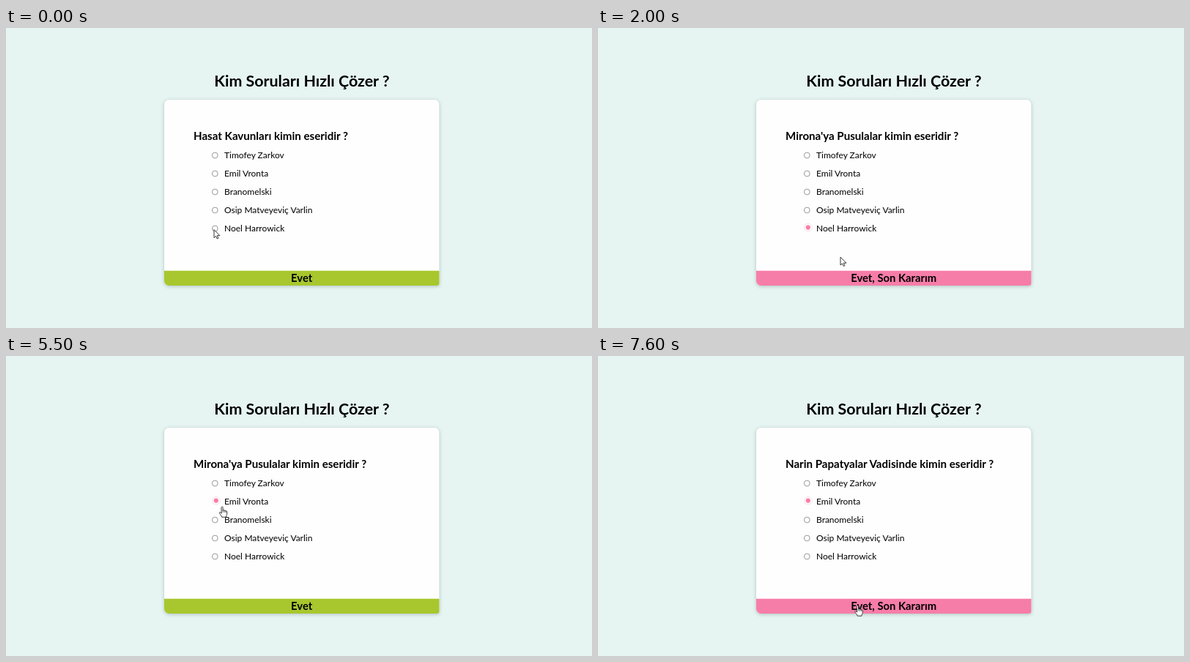
Write an HTML page that moves like this. It is 800 px wide and 410 px high and loops after 8 s.

```html
<!DOCTYPE html>
<html lang="tr">
<head>
<meta charset="utf-8">
<title>Quiz</title>
<style>
  html, body { margin: 0; width: 100%; height: 100%; overflow: hidden; background: #e6f5f2; }
  svg { display: block; width: 800px; height: 410px; }
  text { font-family: Lato, "Open Sans", sans-serif; fill: #000; }
  .bold { font-weight: 700; }
  .card { fill: #fffeff; filter: drop-shadow(0 1.5px 2.5px rgba(20, 50, 45, .28)); }
  .ring { fill: #fff; stroke: #85858a; stroke-width: .85; }
  .halo { fill: #fffafc; stroke: #eedfe6; stroke-width: .8; }
  .dot { fill: #f77da8; }
  .cursor { fill: #fff; stroke: #222; stroke-width: .9; stroke-linejoin: round; stroke-linecap: round; }
</style>
</head>
<body>
<svg viewBox="0 0 800 410">
  <text class="bold" x="404" y="80" font-size="21.4" text-anchor="middle">Kim Soruları Hızlı Çözer ?</text>
  <path class="card" d="M222.5 98H585A6.5 6.5 0 0 1 591.5 104.5V349Q591.5 352 588.5 352H222.5A6.5 6.5 0 0 1 216 345.5V104.5A6.5 6.5 0 0 1 222.5 98Z"/>
  <path id="button" d="M216 331.7H591.5V349Q591.5 352 588.5 352H222.5A6.5 6.5 0 0 1 216 345.5Z"/>
  <text id="label" class="bold" x="403.7" y="347" font-size="14.8" text-anchor="middle"></text>
  <text id="question" class="bold" x="256" y="152.5" font-size="15.1"></text>
  <g id="options"></g>
  <g id="arrow" class="cursor">
    <path d="M0 0V10.6L2.5 8.4L4.2 12L5.9 11.2L4.3 7.7H7.5Z"/>
  </g>
  <g id="hand" class="cursor">
    <path d="M-1.1 1C-1.1 -.3 1.1 -.3 1.1 1V5.1C1.5 4.3 3 4.5 3.1 5.4C3.6 4.8 4.9 5 5 5.9C5.6 5.5 6.7 5.8 6.7 6.9V9.6C6.7 11.4 5.6 12 5.4 14.2H-.3C-.6 12.4 -2.2 11.3 -3.4 9.2C-4.2 7.8 -3 7 -2.1 7.9L-1.1 8.9Z"/>
    <path d="M1.1 5.1V7.3M3.1 5.4V7.5M5 5.9V7.7" fill="none" stroke-width=".7"/>
  </g>
</svg>
<script>
const LOOP = 8000, STEP = 100, FADE = 200;
const GREEN = [168, 199, 46], PINK = [247, 125, 169];
const names = ["Timofey Zarkov", "Emil Vronta", "Branomelski", "Osip Matveyeviç Varlin", "Noel Harrowick"];
const works = ["Hasat Kavunları", "Mirona'ya Pusulalar", "Narin Papatyalar Vadisinde"];

// What the visitor does, and when.
const events = [
  { t: 0, work: 0, pick: -1, final: 0, since: -FADE },
  { t: 200, pick: 4 },
  { t: 1100, final: 1, since: 1100 },
  { t: 1300, work: 1 },
  { t: 2300, final: 0, since: 2300 },
  { t: 5100, pick: 1 },
  { t: 6000, final: 1, since: 6000 },
  { t: 7000, work: 2 }
];

// Pointer strokes; it rests between them.
const strokes = [
  { t: 300, span: 600, x: 331.5, y: 337 },
  { t: 1500, span: 300, x: 331, y: 313.5 },
  { t: 2200, span: 800, x: 280, y: 217.5 },
  { t: 3200, span: 900, x: 285, y: 202 },
  { t: 5100, span: 400, x: 295, y: 206 },
  { t: 5500, span: 400, x: 352, y: 359 },
  { t: 5900, span: 300, x: 354.5, y: 345 },
  { t: 6700, span: 300, x: 354.5, y: 341 }
];

const $ = id => document.getElementById(id);
const mix = (a, b, k) => a + (b - a) * k;
const clamp = k => Math.min(1, Math.max(0, k));
const ease = k => k * k * (3 - 2 * k);

$("options").innerHTML = names.map((name, i) => {
  const y = 174 + i * 25;
  return `<circle class="ring" cx="285.3" cy="${y}" r="3.9"/>
    <g class="mark"><circle class="halo" cx="286.8" cy="${y - 1.4}" r="5.3"/>
    <circle class="dot" cx="286.8" cy="${y - 1.4}" r="3.1"/></g>
    <text x="298" y="${y + 4.2}" font-size="12">${name}</text>`;
}).join("");
const rings = document.querySelectorAll(".ring");
const marks = document.querySelectorAll(".mark");

const show = (el, on) => el.style.display = on ? "" : "none";

function pointer(t) {
  let x = 284, y = 276;
  for (const s of strokes) {
    const k = ease(clamp((t - s.t) / s.span));
    x = mix(x, s.x, k);
    y = mix(y, s.y, k);
  }
  return [x, y];
}

function draw(t) {
  const state = Object.assign({}, ...events.filter(e => e.t <= t));
  const fade = clamp((t - state.since + STEP) / FADE);
  const pink = state.final ? fade : 1 - fade;
  $("button").setAttribute("fill", `rgb(${GREEN.map((c, i) => Math.round(mix(c, PINK[i], pink)))})`);
  $("label").textContent = state.final ? "Evet, Son Kararım" : "Evet";
  $("question").textContent = works[state.work] + " kimin eseridir ?";
  names.forEach((_, i) => {
    show(rings[i], i !== state.pick);
    show(marks[i], i === state.pick);
  });

  const [x, y] = pointer(t);
  const onButton = y > 331 && y < 352;
  const onOption = x > 289 && y > 192 && y < 210;
  show($("hand"), onButton || onOption);
  show($("arrow"), !onButton && !onOption);
  for (const id of ["arrow", "hand"]) $(id).setAttribute("transform", `translate(${x.toFixed(2)} ${y.toFixed(2)})`);
}

const start = performance.now();
function tick() {
  const t = Math.max(0, performance.now() - start) % LOOP;
  draw(Math.floor(t / STEP) * STEP);
  requestAnimationFrame(tick);
}
tick();
</script>
</body>
</html>
```
